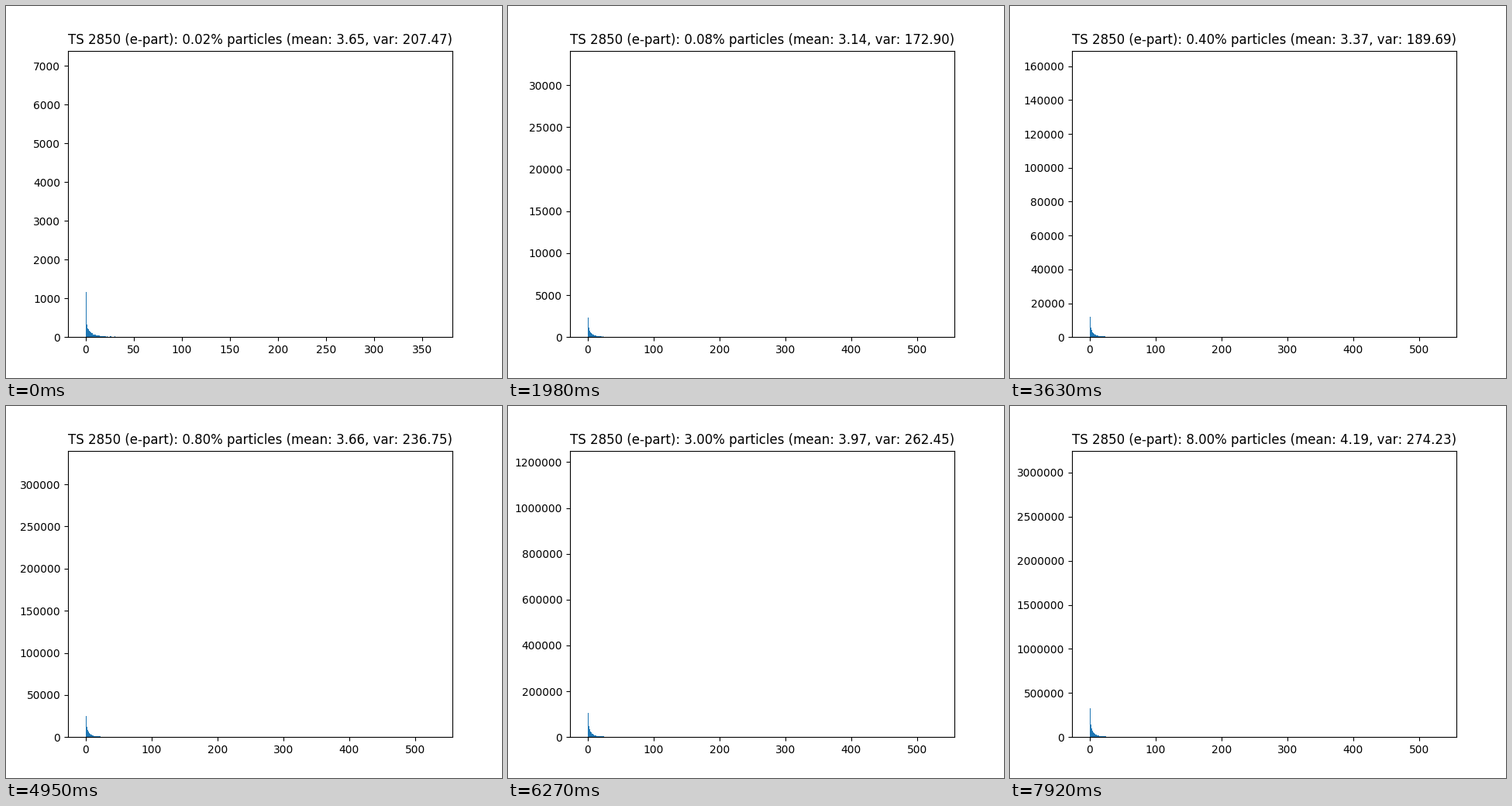
A matplotlib script for the animation above (8000 ms loop, 640 by 480 pixels).

```python
import numpy as np
import matplotlib.pyplot as plt
from matplotlib.animation import FuncAnimation
from matplotlib.patches import Polygon

LOOP, TICK, HOLD = 8000, 40, 330
AX_W, AX_H = 496, 369.6   # axes size in pixels
FIRST, COLS = 23, 60      # first bar's offset and number of pixel columns

# sample share in percent: hundredths, then tenths, then whole percents
SHARES = np.concatenate([np.arange(2, 10) / 100, np.arange(1, 10) / 10,
                         np.arange(1.0, 9.0)])

# key points: step, mean, variance, axis top per percent
KEYS = np.array([
    (0, 3.65, 207.47, 369600),
    (6, 3.14, 172.90, 426500),
    (11, 3.37, 189.69, 423000),
    (15, 3.66, 236.75, 425100),
    (17, 3.75, 265.53, 427900),
    (21, 4.19, 259.37, 405600),
    (24, 4.19, 274.23, 406100),
])


def stats(step):
    mean, var, top = (np.interp(step, KEYS[:, 0], col) for col in KEYS.T[1:])
    return mean, var, top * SHARES[step]


def x_max(step):
    """Largest energy seen; it soon saturates as the sample grows."""
    return 530 - 166.8 * np.exp(-2 * step)


def bar_heights(step, top):
    """Bar heights in whole pixels: a spike, then a noisy power-law tail."""
    rng = np.random.default_rng(step)
    per_px = top / AX_H
    zoom = 530 / x_max(step)
    growth = min(SHARES[step], 6)
    spike = (25 + 2 * growth) * zoom ** 2.2
    energy = np.arange(COLS) * 1.1 * x_max(step) / AX_W
    tail = (12 + 0.6 * growth) * zoom ** 0.75 * (1 + energy / 8) ** -2.5
    tail = rng.poisson(tail * per_px) / per_px
    return np.round(np.append(spike, tail))


def outline(step, top):
    heights = bar_heights(step, top)
    edges = FIRST + np.arange(len(heights) + 1)
    x = np.repeat(edges, 2)
    y = np.concatenate([[0], np.repeat(heights, 2), [0]])
    return np.column_stack([x / AX_W, y / AX_H])


plt.rcParams["text.kerning_factor"] = 6
fig, ax = plt.subplots(figsize=(6.4, 4.8), dpi=100)
ax.ticklabel_format(style="plain", axis="y")
title = ax.set_title("")
bars = Polygon([(0, 0), (0, 0)], facecolor="#1f77b4", linewidth=0,
               transform=ax.transAxes, snap=True)
ax.add_patch(bars)


def update(i):
    step = min((i * TICK + TICK - 10) // HOLD, len(SHARES) - 1)
    mean, var, top = stats(step)
    title.set_text(f"TS 2850 (e-part): {SHARES[step]:.2f}% particles "
                   f"(mean: {mean:.2f}, var: {var:.2f})")
    ax.set_xlim(-0.05 * x_max(step), 1.05 * x_max(step))
    ax.set_ylim(0, top)
    bars.set_xy(outline(step, top))
    return bars, title


anim = FuncAnimation(fig, update, frames=LOOP // TICK, interval=TICK,
                     init_func=lambda: update(0), repeat=True, repeat_delay=0)
plt.show()
```
